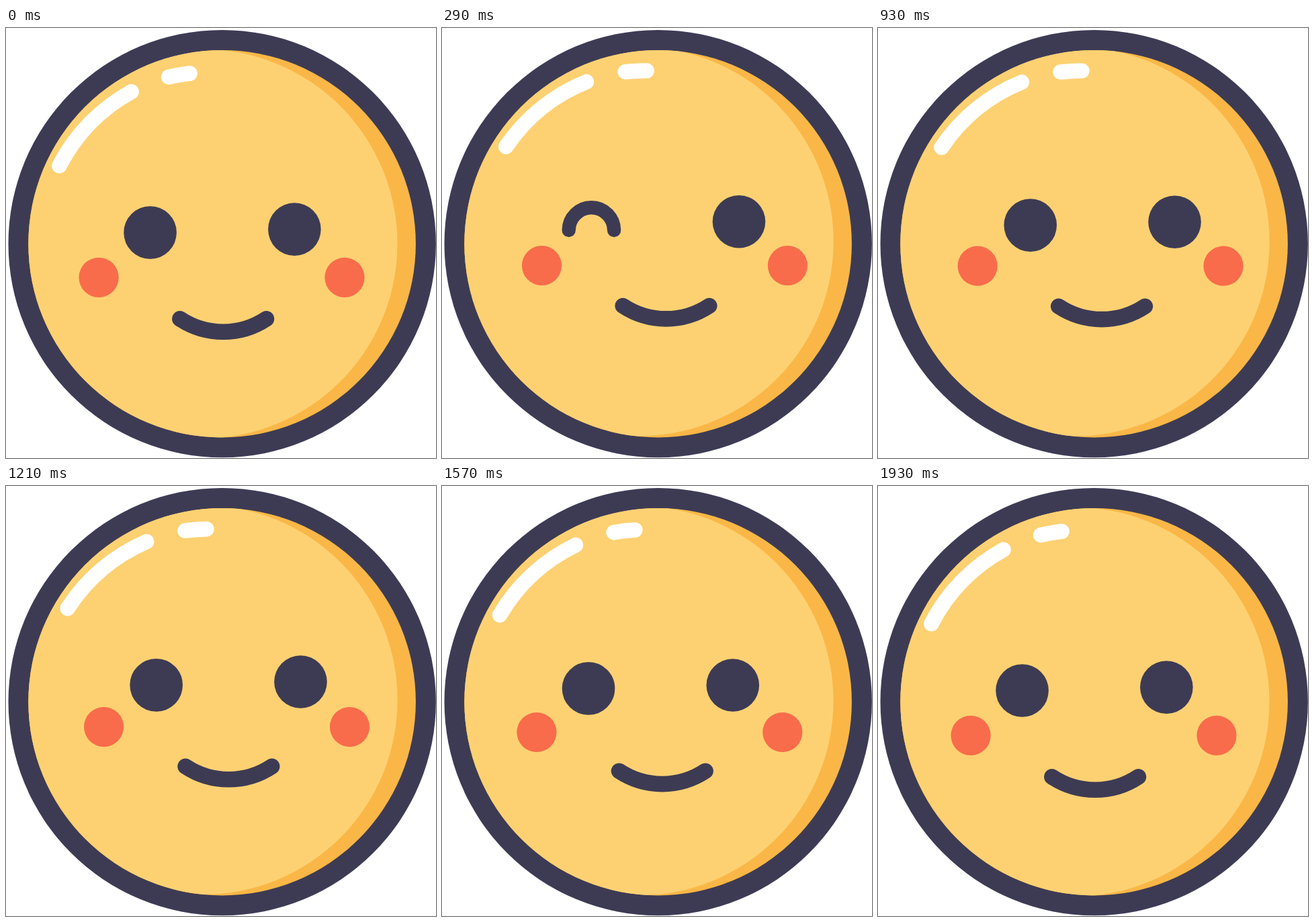
These frames come from a looping animation (640 px wide and 640 px high, 2 s). An HTML page:

```html
<!DOCTYPE html>
<html lang="en">
<head>
<meta charset="utf-8">
<title>Winking face</title>
<style>
  html, body { margin: 0; width: 100%; height: 100%; overflow: hidden; background: #fff; }
  svg { display: block; width: 100%; height: 100%; }
  .line { fill: none; stroke: #3d3b54; stroke-linecap: round; }
  .shine { fill: none; stroke: #fff; stroke-width: 22.6; stroke-linecap: round; }
</style>
</head>
<body>
<svg viewBox="0 0 640 640">
  <defs>
    <clipPath id="disc"><circle cx="321.6" cy="321.2" r="288.3"/></clipPath>
  </defs>
  <circle cx="321.7" cy="321.1" r="318.2" fill="#3d3b54"/>
  <circle cx="321.6" cy="321.2" r="288.3" fill="#fab747"/>
  <g clip-path="url(#disc)">
    <circle id="light" cx="292.8" cy="321.2" r="289.7" fill="#fdd172"/>
  </g>
  <g id="shine">
    <path class="shine" d="M79.4 205A264 264 0 0 1 186.6 94.8"/>
    <path class="shine" d="M242.2 73A264 264 0 0 1 273.6 67.6"/>
  </g>
  <g id="face">
    <circle cx="429.4" cy="299.6" r="39.3" fill="#3d3b54"/>
    <path id="eye" class="line"/>
  </g>
  <g id="cheeks" fill="#f86c4b">
    <circle cx="138.1" cy="371.3" r="29.6"/>
    <circle cx="504" cy="371.3" r="29.6"/>
  </g>
  <path id="mouth" class="line" stroke-width="23.6" d="M258.9 432.8A116.3 116.3 0 0 0 387.5 432.8"/>
</svg>
<script>
  const LOOP = 2000, FPS = 14;
  const [light, shine, face, eye, cheeks, mouth] =
    ['light', 'shine', 'face', 'eye', 'cheeks', 'mouth'].map(id => document.getElementById(id));

  const clamp = x => Math.min(1, Math.max(0, x));
  const mix = (a, b, u) => a + (b - a) * u;
  const span = (step, from, to) => clamp((step - from) / (to - from));
  const ease = u => (1 - Math.cos(Math.PI * u)) / 2;
  const easeIn = u => 1 - Math.cos(Math.PI * u / 2);

  const move = (node, dx, dy) => node.setAttribute('transform', `translate(${dx} ${dy})`);
  const turn = (node, angle) => node.setAttribute('transform', `rotate(${angle} 321.6 321.2)`);

  // A wide, very short arc is a round eye; a thin, long one is a wink.
  function drawEye(closed) {
    const x = mix(214.6, 209.8, closed), y = mix(304.5, 312.3, closed);
    const r = mix(0.02, 33.7, closed);
    eye.setAttribute('d', `M${x - r} ${y}A${r} ${r} 0 0 1 ${x + r} ${y}`);
    eye.setAttribute('stroke-width', mix(78.6, 20.4, closed));
  }

  function draw(time) {
    const step = Math.floor((Math.floor(time / 10) * 10 + 5) * FPS / 1000);
    const rise = ease(span(step, 0, 4));
    const tilt = rise * (1 - easeIn(span(step, 10, 27)));
    const lift = rise * (1 - Math.min(1, ease(span(step, 11, 28)) / ease(16 / 17)));

    turn(light, 6.95 * tilt);
    turn(shine, 6.95 * tilt);
    move(mouth, 10.3 * tilt, -19.3 * tilt);
    move(face, 12.6 * lift, -11.3 * lift);
    move(cheeks, 10.4 * lift, -17.7 * lift);
    drawEye(rise * (1 - ease(span(step, 9, 13))));
  }

  const start = performance.now();
  function tick() {
    draw((performance.now() - start) % LOOP);
    requestAnimationFrame(tick);
  }
  tick();
</script>
</body>
</html>
```
